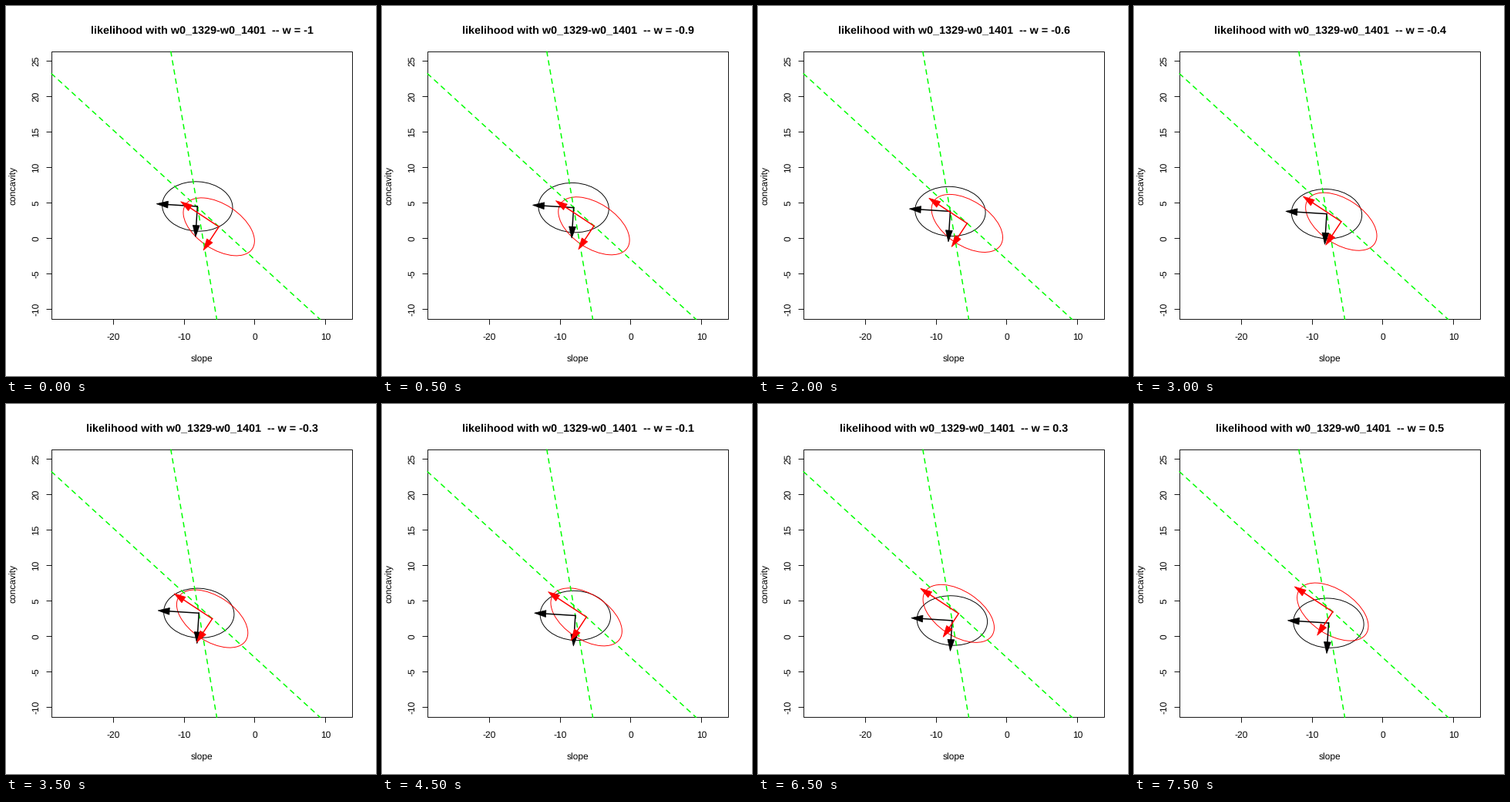
These frames come from a looping animation (480 by 480 pixels, 8000 ms). A matplotlib script:

```python
import matplotlib.pyplot as plt
import numpy as np
from matplotlib.animation import FuncAnimation
from matplotlib.patches import Ellipse, Polygon, Rectangle

plt.rcParams["font.family"] = ["Liberation Sans", "DejaVu Sans"]
plt.rcParams["text.hinting"] = "no_hinting"

SIZE, DPI = 480, 72                     # at 72 dpi one point is one pixel
FRAMES, INTERVAL = 16, 500
LEFT, RIGHT, TOP, BOTTOM = 59.5, 449.5, 59.5, 406.5
LINE = 14.4                             # margin line height
HEAD, HALF = 14.8, 4.4                  # arrow head length and half width


def px(x):
    return 322.9 + 9.19 * x


def py(y):
    return 301.4 - 9.19 * y


fig = plt.figure(figsize=(SIZE / DPI, SIZE / DPI), dpi=DPI, facecolor="white")
ax = fig.add_axes([0, 0, 1, 1])
ax.set_xlim(0, SIZE)
ax.set_ylim(SIZE, 0)
ax.axis("off")


def label(x, y, text, size=12, **kw):
    return ax.text(x, y, text, size=size, ha="center", va="baseline",
                   rotation_mode="anchor", **kw)


def tick(xs, ys):
    ax.plot(xs, ys, color="black", lw=0.9, solid_capstyle="butt", snap=False)


def draw_axes():
    ax.add_patch(Rectangle((LEFT, TOP), RIGHT - LEFT, BOTTOM - TOP,
                           fill=False, ec="black", lw=0.9, snap=False))
    for v in range(-20, 11, 10):
        x = np.floor(px(v)) + 0.5
        tick([x, x], [BOTTOM, BOTTOM + 7])
        label(px(v), BOTTOM + 26.5, str(v))
    for v in range(-10, 26, 5):
        y = np.floor(py(v)) + 0.5
        tick([LEFT - 7, LEFT], [y, y])
        label(LEFT - 1.2 * LINE, py(v), str(v), rotation=90)
    label(254.4, BOTTOM + 26.5 + 2 * LINE, "slope")
    label(LEFT - 3.2 * LINE, 232.8, "concavity", rotation=90)


class Track:
    """Straight dashed path on which an ellipse centre moves."""

    def __init__(self, start, end):
        self.start, self.end = np.array(start), np.array(end)
        ax.plot(*zip(start, end), color="#00ff00", lw=1.5, zorder=3,
                ls=(0, (4, 4)), dash_capstyle="round")

    def at(self, y):
        t = (y - self.start[1]) / (self.end[1] - self.start[1])
        return self.start + t * (self.end - self.start)


class Arrow:
    def __init__(self, vec, color, z):
        self.vec = np.array(vec)
        self.dir = self.vec / np.hypot(*self.vec)
        self.shaft, = ax.plot([], [], color=color, lw=1.5, zorder=z,
                              snap=False)
        self.head = Polygon(np.zeros((3, 2)), fc=color, ec=color, lw=0.75,
                            joinstyle="round", zorder=z, snap=False)
        ax.add_patch(self.head)

    def move(self, origin):
        end = origin + self.vec
        side = HALF * np.array([-self.dir[1], self.dir[0]])
        base = end - self.dir * HEAD / 2
        self.shaft.set_data(*zip(origin, end))
        self.head.set_xy([end + self.dir * HEAD / 2, base + side, base - side])


class Blob:
    """Ellipse with arrows along its two half axes."""

    def __init__(self, track, y0, step, a, b, tilt, color, z):
        self.track, self.y0, self.step = track, y0, step
        self.ring = Ellipse((0, 0), 2 * a, 2 * b, angle=tilt, fill=False,
                            ec=color, lw=0.95, zorder=2)
        ax.add_patch(self.ring)
        c, s = np.cos(np.radians(tilt)), np.sin(np.radians(tilt))
        self.arrows = [Arrow((-a * c, -a * s), color, z),
                       Arrow((-b * s, b * c), color, z)]

    def move(self, i):
        pos = self.track.at(self.y0 + self.step * i)
        self.ring.set_center(pos)
        for arrow in self.arrows:
            arrow.move(pos)


draw_axes()
title = label(254.4, 34.8, "", size=14.4, weight="bold")
shallow = Track((59.04, 87.8), (407.6, 406.6))
steep = Track((213.8, 59.04), (273.5, 406.6))
blobs = [Blob(steep, 260.0, 1.61, 45.7, 32.1, 3.6, "black", 4),
         Blob(shallow, 286.4, -1.12, 51.9, 29.1, 33.4, "red", 5)]


def update(i):
    w = round(-1 + 0.1 * i, 1) + 0.0
    title.set_text(f"likelihood with w0_1329-w0_1401  -- w = {w:g}")
    for blob in blobs:
        blob.move(i)
    return []


anim = FuncAnimation(fig, update, frames=FRAMES, interval=INTERVAL,
                     init_func=lambda: update(0), repeat=True, repeat_delay=0)
plt.show()
```
